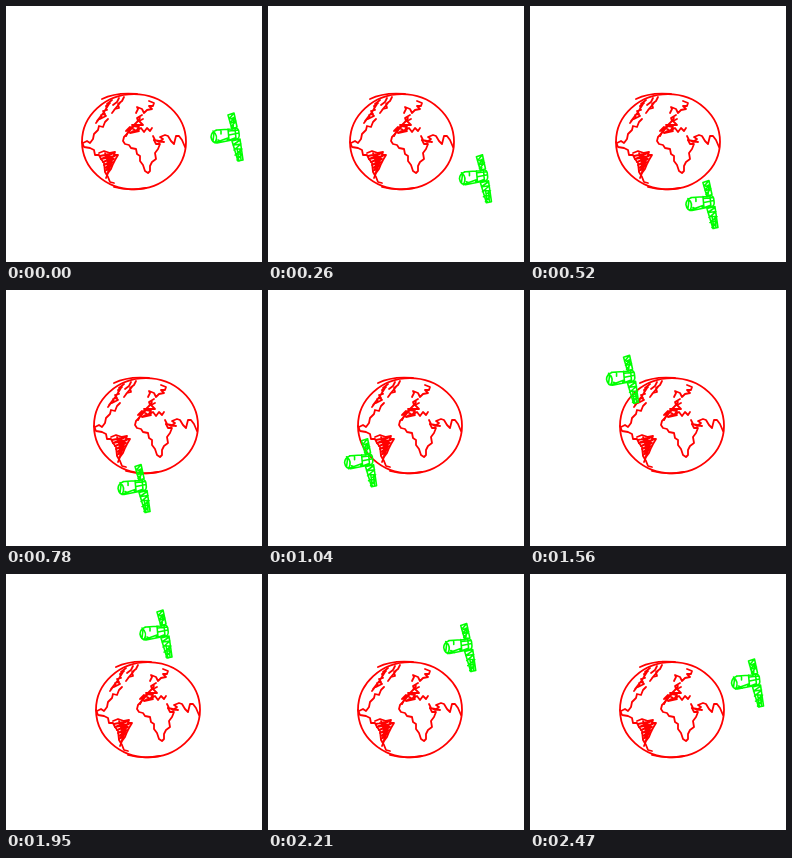
An HTML page that plays this animation: 256 px wide and 256 px high, repeating every 2.6 s.

```html
<!DOCTYPE html>
<html lang="en">
<head>
<meta charset="utf-8">
<title>Earth and satellite</title>
<style>
html, body { margin: 0; width: 100%; height: 100%; overflow: hidden; background: #fff; }
svg { display: block; width: 100%; height: 100%; }
path, ellipse { fill: none; stroke-width: 1.8; stroke-linecap: round; stroke-linejoin: round; }
#earth { stroke: #f00; }
#satellite { stroke: #0f0; }
#satellite path { stroke-width: 1.6; }
</style>
</head>
<body>
<svg viewBox="0 0 256 256">
  <g id="earth">
    <ellipse cx="128" cy="135.7" rx="52" ry="47.6"/>
    <path d="M96 93Q110 86 131 88M108 181Q122 185 140 182"/>
    <!-- North America and the Arctic -->
    <path d="M77 137L81 135 84 137 87 133 88 128 92 124 93 120 97 121 99 116 102 113"/>
    <path d="M90 117L93 113 96 112 95 109 99 108 97 105 101 104 100 100 104 97M91 115L98 106 103 98M94 113L100 110 98 108M101 98L106 94"/>
    <path d="M106 107L109 103 113 102 112 98 116 95 118 91M108 104L114 97M107 99L111 96 113 92"/>
    <!-- South America -->
    <path d="M76 136L78 141 84 142 88 144 89 149 93 149 95 153 98 157 99 166 102 171 104 176 108 177"/>
    <path d="M93 147L98 145 104 147 109 146 108 149 112 149 109 154 107 158 105 163 102 167 100 172"/>
    <path d="M94 150L108 147 95 153 109 150 97 156 108 153 98 159 107 156 99 162 106 159 99 165 104 162 101 168M99 147L104 162M104 147L101 163M108 149L103 160"/>
    <!-- Africa -->
    <path d="M121 128L118 131 117 135 119 138 123 139 125 142 130 143 131 148 134 150 134 155 137 159 139 165 142 167 144 165 144 160 146 156 150 153 149 147 152 143 154 138 150 138 148 134"/>
    <!-- Europe -->
    <path d="M120 130L123 124 128 119 132 115 131 112 136 109M122 127L134 112M125 123L128 120 133 121 130 125 135 122 138 126 141 122 144 125 146 122M120 125L124 121 129 124 124 127 133 125M126 119L137 119 133 115 137 113"/>
    <path d="M130 107L132 103 131 101 136 103 138 107 141 104 146 103 143 100 147 100 148 97 143 95"/>
    <!-- Asia -->
    <path d="M147 130L149 134 153 136 157 133 154 131 159 129 162 130 165 135 168 138 170 130 173 130 176 134 179 141M148 134L158 136"/>
  </g>
  <g id="satellite">
    <path d="M226 123L211 124Q205 126 205 131 206 137 211 137L231 133Q234 132 233 127 233 122 229 122ZM207 125Q213 130 209 137M208 127L207 135M210 124L215 124M211 136L222 132 221 135 229 132M212 134L216 136M215 125L215 128M222 123L223 134M229 122L230 133M223 129L233 127M223 125L232 124"/>
    <path d="M222 109L228 107 231 121 226 123ZM223 113L228 107M224 117L229 111 225 113M225 121L230 115 225 117M227 122L228 113"/>
    <path d="M226 135L234 133 237 154 232 155ZM227 139L234 134M228 144L235 138 228 139M229 149L236 143 230 143M231 154L236 148 231 148M233 155L231 142M235 154L234 144"/>
  </g>
</svg>
<script>
const STEP = 130, COUNT = 20, RADIUS = 71, DRIFT = 14, SETTLE = 9;
const earth = document.getElementById('earth');
const satellite = document.getElementById('satellite');

function move(node, x, y) {
  node.setAttribute('transform', `translate(${x} ${y})`);
}

function draw(now) {
  const step = Math.floor(now / STEP) % COUNT;
  const left = Math.max(0, 1 - step / SETTLE);
  const angle = step / COUNT * 2 * Math.PI;
  move(earth, Math.round(DRIFT * (1 - left * left)), 0);
  move(satellite, RADIUS * (Math.cos(angle) - 1), RADIUS * Math.sin(angle));
}

let start;
function tick(now) {
  start ??= now;
  draw(now - start);
  requestAnimationFrame(tick);
}
draw(0);
requestAnimationFrame(tick);
</script>
</body>
</html>
```
